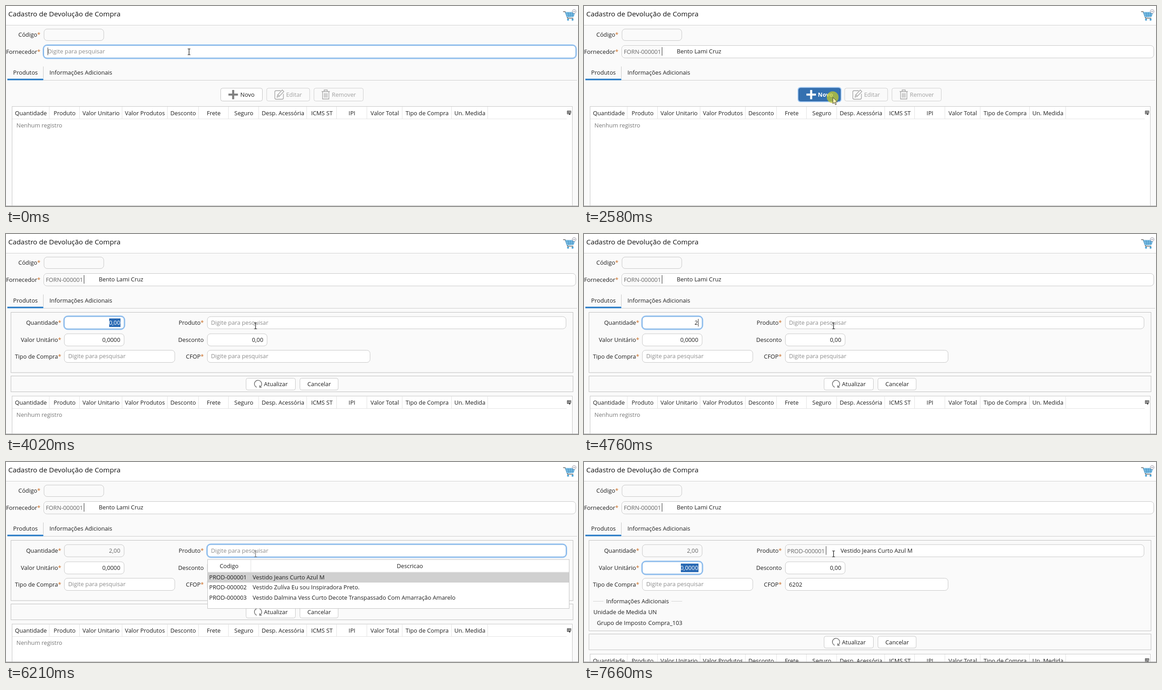
Write an HTML page that moves like this. It is 1264 by 443 pixels and loops after 8 s.

```html
<!DOCTYPE html>
<html lang="pt-BR">
<head>
<meta charset="utf-8">
<title>Cadastro de Devolução de Compra</title>
<style>
html, body { margin: 0; width: 100%; height: 100%; overflow: hidden; background: #fafafa; }
svg { display: block; width: 100%; height: 100%; }
text { font: 12.8px "Open Sans", "Noto Sans", sans-serif; fill: #1e1e1e; white-space: pre; }
</style>
</head>
<body>
<svg id="stage" viewBox="0 0 1264 443"></svg>
<script>
const stage = document.getElementById('stage');
const starts = [0, 410, 1130, 1860, 2580, 3300, 4020, 4760, 5480, 6210, 6930, 7660];
const LOOP = 8000, HINT = 'Digite para pesquisar', DRESS = 'Vestido Jeans Curto Azul M';
const columns = ['Quantidade', 'Produto', 'Valor Unitario', 'Valor Produtos', 'Desconto', 'Frete', 'Seguro',
  'Desp. Acessória', 'ICMS ST', 'IPI', 'Valor Total', 'Tipo de Compra', 'Un. Medida'];
const edges = [14, 96, 163, 257, 357, 426, 492, 559, 665, 731, 798, 876, 985, 1065];

const text = (x, y, s, fill = '#1e1e1e', anchor = 'start', extra = '') =>
  `<text x="${x}" y="${y}" text-anchor="${anchor}" style="fill:${fill};${extra}">${s}</text>`;
const rect = (x, y, r, b, fill, stroke = 'none', radius = 0, width = 1) =>
  `<rect x="${x}" y="${y}" width="${r - x}" height="${b - y}" rx="${radius}" fill="${fill}" stroke="${stroke}" stroke-width="${width}"/>`;
const path = (d, stroke, width = 1, fill = 'none') =>
  `<path d="${d}" stroke="${stroke}" stroke-width="${width}" fill="${fill}"/>`;
const vline = (x, top, bottom, color = '#333') => path(`M${x} ${top}V${bottom}`, color);
const hline = (x, r, y, color) => path(`M${x} ${y}H${r}`, color);

const label = (right, y, s, required = true) =>
  `<text x="${right}" y="${y}" text-anchor="end">${s}${required ? '<tspan fill="#c8691e">*</tspan>' : ''}</text>`;

function field(x, y, r, b, focus, fill = '#fff') {
  const ring = focus ? rect(x - .5, y - .5, r + .5, b + .5, '#fff', '#9cc6f2', 8, 4) : '';
  return ring + rect(x, y, r, b, fill, focus ? '#6ba5de' : '#c6c6c6', 7);
}

// A number field whose content may be selected
function number(x, y, b, s, selectFrom, color = '#1e1e1e') {
  const mid = (y + b) / 2;
  return field(x, y, x + 132, b, selectFrom, color === '#666' ? '#fafafa' : '#fff') +
    (selectFrom ? rect(selectFrom, mid - 9.5, 253, mid + 9.5, '#2a6ab4') : '') +
    text(x + 123.5, mid + 4.5, s, selectFrom ? '#fff' : color, 'end');
}

// A chosen record: grey code, divider and name
const record = (x, y, code, divider, nameX, name) =>
  text(x, y + 1, code, '#666') + vline(divider, y - 14, y + 5) + text(nameX, y, name);

const ibeam = (x, y, color = '#111') =>
  path(`M${x - 3} ${y - 6.5}h2.5l.5 .5l.5 -.5h2.5M${x} ${y - 6}v12M${x - 3} ${y + 6.5}h2.5l.5 -.5l.5 .5h2.5`, color, 1.2);
const arrow = (x, y, fill) =>
  path(`M${x} ${y}v14l3.2 -3l2.3 5.2l2.3 -1l-2.3 -5h4.6z`, '#333', 1, fill);

const cart =
  path('M1231 12.5h4.5l5.5 14.5h12.5', '#666', 1.6) +
  path('M1236 14h21l-3 9.5l-14.5 1z', '#4ba3d6', 1, '#8cc6e8') +
  path('M1237 17h19M1238 20.5h17M1242 14l1.500 10M1247 14v10M1252 14l-1 10', '#3b8fc4') +
  '<circle cx="1242" cy="30.300" r="2.200" fill="#4ba3d6"/><circle cx="1252" cy="30.300" r="2.200" fill="#4ba3d6"/>' +
  '<circle cx="1255.500" cy="12" r="4.200" fill="#fff" stroke="#8b8b9b"/>' + hline(1253, 1258, 12, '#77778a');

function base(filled, focus) {
  return rect(0, 0, 1264, 443, '#fafafa') + rect(0, 0, 1264, 42, '#fff') + hline(0, 1264, 42.5, '#cfcfcf') +
    text(5, 23, 'Cadastro de Devolução de Compra', '#111', 'start', 'font-size:15.35px') + cart +
    label(76, 68, 'Código') + field(84, 51, 216, 76.5, false, '#fafafa') +
    label(76, 105.5, 'Fornecedor') + field(83.5, 87.5, 1259, 115, focus) +
    (filled ? rect(86, 89, 172, 114, '#fafafa', 'none', 5) + record(88, 105, 'FORN-000001', 172.5, 205, 'Bento Lami Cruz')
      : text(92, 105, HINT, '#8c8c8c') + vline(92.5, 92, 109)) +
    text(43, 151.5, 'Produtos', '#1e1e1e', 'middle') + text(96, 151.5, 'Informações Adicionais') +
    vline(82.5, 134, 160, '#c6c6c6') + hline(83, 1262, 164.5, '#cbcbcb') + rect(3, 161, 82.5, 164.5, '#2f7fc8');
}

function table(y) {
  let s = rect(13.5, y + .5, 1251.5, 460, '#fff', '#c6c6c6') + hline(14, 1239, y + 28, '#e2e2e2');
  columns.forEach((name, i) => {
    s += text((edges[i] + edges[i + 1]) / 2, y + 19.5, name, '#1e1e1e', 'middle') +
      vline(edges[i + 1] - .5, y + 1, y + 28, '#e2e2e2');
  });
  return s + path(`M1240 ${y + 10.5}h8v5M1240.500 ${y + 10}v7h3M1240 ${y + 13.5}h8M1244 ${y + 10}v6`, '#222', 1.2) +
    path(`M1242.500 ${y + 16}h6l-3 3.500z`, 'none', 0, '#222') +
    text(23, y + 46.5, 'Nenhum registro', '#777') + hline(0, 1264, 442.5, '#b0b0b0');
}

const plus = color => path('M491.500 196.300h21M502 186v20.500', color, 4.6);

function toolbar(hot, focus) {
  const off = '#a0a0a0';
  return (focus ? rect(474, 181.5, 567, 211, 'none', '#9cc6f2', 4, 4) : '') +
    rect(474.5, 182, 566.5, 210.5, hot ? '#3470b0' : '#fff', hot ? '#2a5f9c' : '#c2c2c2', 4) +
    plus(hot ? '#fff' : '#808080') +
    text(533.5, 201, 'Novo', hot ? '#fff' : '#1e1e1e', 'middle', hot ? 'font-weight:700' : '') +
    rect(576, 182, 671, 210.5, '#fafafa', '#cecece', 4) +
    path('M607 187.500h-10q-3 0 -3 3v13q0 3 3 3h13q3 0 3 -3v-9M599 202l1.500 -5.500l10 -10.500l3.500 3.500l-10 10.500zM600.500 196.500l3.500 3.500', off, 1.3) +
    text(619, 201, 'Editar', off) +
    rect(680.5, 182, 789.5, 210.5, '#fafafa', '#cecece', 4) +
    path('M697.500 189.500h18M703 189v-3h7v3M699.500 190v16h14v-16M703.500 193v10M706.500 193v10M709.500 193v10', off, 1.3) +
    text(720, 201, 'Remover', off);
}

function actions(y) {
  const mid = y + 18;
  return rect(11, y + .5, 1253, y + 35.5, '#fafafa', '#bdbdbd') +
    rect(530.5, mid - 12.5, 639.5, mid + 13.5, '#fff', '#c6c6c6', 4) +
    path(`M554 ${mid + 7.5}a8 8 0 1 1 7 -.5M565 ${mid + 7.5}h-4.500v-4.500`, '#777', 1.5) +
    text(570, mid + 5, 'Atualizar') +
    rect(649.5, mid - 12.5, 734, mid + 13.5, '#fff', '#c6c6c6', 4) + text(692, mid + 5, 'Cancelar', '#1e1e1e', 'middle');
}

function form(i) {
  const first = i === 5, chosen = i >= 10;
  const x = first ? 449.5 : 445, right = x - 8;
  const [a, b, c] = first ? [183, 219.5, 256] : [183, 221, 257.5];
  const h = first ? 26 : 27, low = h / 2 + 4.5;
  const bottom = first ? 303.5 : chosen ? 374 : 307;
  const productFocus = i >= 8 && i <= 10;
  const amount = i < 7 ? '0,00' : i === 7 ? '2' : '2,00';
  let s = rect(11, 173.5, 1253, bottom, '#fafafa', '#bdbdbd') +
    label(122, a + low, 'Quantidade') + number(129, a, a + h, amount, i === 6 && 228, i > 7 ? '#666' : undefined);
  if (i === 7) s += field(129, a, 261, a + h, true) + text(251.5, a + low, amount, '#1e1e1e', 'end') + vline(252.5, 188, 205);
  s += label(122, b + low, 'Valor Unitário') + number(129, b, b + h, '0,0000', i === 11 && 214) +
    label(122, c + low, 'Tipo de Compra') + field(129, c, first ? 377.5 : 373, c + h) + text(137.5, c + low - .5, HINT, '#8c8c8c') +
    label(right, a + low, 'Produto') + field(x, a, 1237.5, a + h, productFocus) +
    label(right, b + low, 'Desconto', false) + number(x, b, b + h, '0,00') +
    label(right, c + low, 'CFOP') + field(x, c, first ? 813.5 : 804.5, c + h) +
    (chosen ? text(x + 8, c + low, '6202') : text(x + 8, c + low - .5, HINT, '#8c8c8c'));
  if (chosen) {
    s += rect(447, 185, 535, 209, '#fafafa', 'none', 5) + record(449, 200.5, 'PROD-000001', 535, 567, DRESS) +
      hline(20, 43, 308.5, '#d2d2d2') + text(49, 312.5, 'Informações Adicionais') + hline(193, 217, 308.5, '#d2d2d2') +
      label(137.5, 336.5, 'Unidade de Medida', false) + text(142, 336.5, 'UN') +
      label(137.5, 361, 'Grupo de Imposto', false) + text(142, 361, 'Compra_103');
  } else {
    s += text(x + 8, a + low - .5, HINT, '#8c8c8c') + (i === 8 ? vline(453.5, 187, 205) : '');
  }
  return s + actions(first ? 310 : chosen ? 380.5 : 314) + table(first ? 355 : chosen ? 425 : 358.5);
}

function popup() {
  const rows = [DRESS, 'Vestido Zulíva Eu sou Inspiradora Preto.',
    'Vestido Dalmina Vess Curto Decote Transpassado Com Amarração Amarelo'];
  return rect(445.5, 216, 1244.5, 324.5, '#fff', '#c2c2c2') + hline(446, 1244, 244, '#dedede') +
    vline(541, 217, 244, '#dedede') + rect(446, 244.5, 1244, 267, '#d0d0d0') +
    text(493, 235, 'Codigo', '#1e1e1e', 'middle') + text(892.5, 235, 'Descricao', '#1e1e1e', 'middle') +
    rows.map((name, k) => text(449, 260 + k * 22.4, 'PROD-00000' + (k + 1)) + text(545, 260 + k * 22.4, name)).join('');
}

function scene(i) {
  let s = base(i > 0, i < 4);
  if (i >= 5) {
    const soft = i === 8 || i === 9;
    return s + form(i) + (i === 9 ? popup() : '') + ibeam(551.5, 203.5, soft ? '#666' : '#111');
  }
  s += toolbar(i >= 3, i === 4) + table(222);
  if (i < 2) return s + ibeam(404.5, 101.5);
  if (i === 4) s += '<circle cx="549.500" cy="202" r="13" fill="#c8cc28" fill-opacity=".72"/>';
  return s + arrow(i === 2 ? 558 : 550, 202.5, i === 4 ? '#fff7b0' : '#fff');
}

let shown = -1;
function tick() {
  const t = performance.now() % LOOP;
  const i = starts.findLastIndex(start => start <= t);
  if (i !== shown) stage.innerHTML = scene(shown = i);
  requestAnimationFrame(tick);
}
tick();
</script>
</body>
</html>
```
